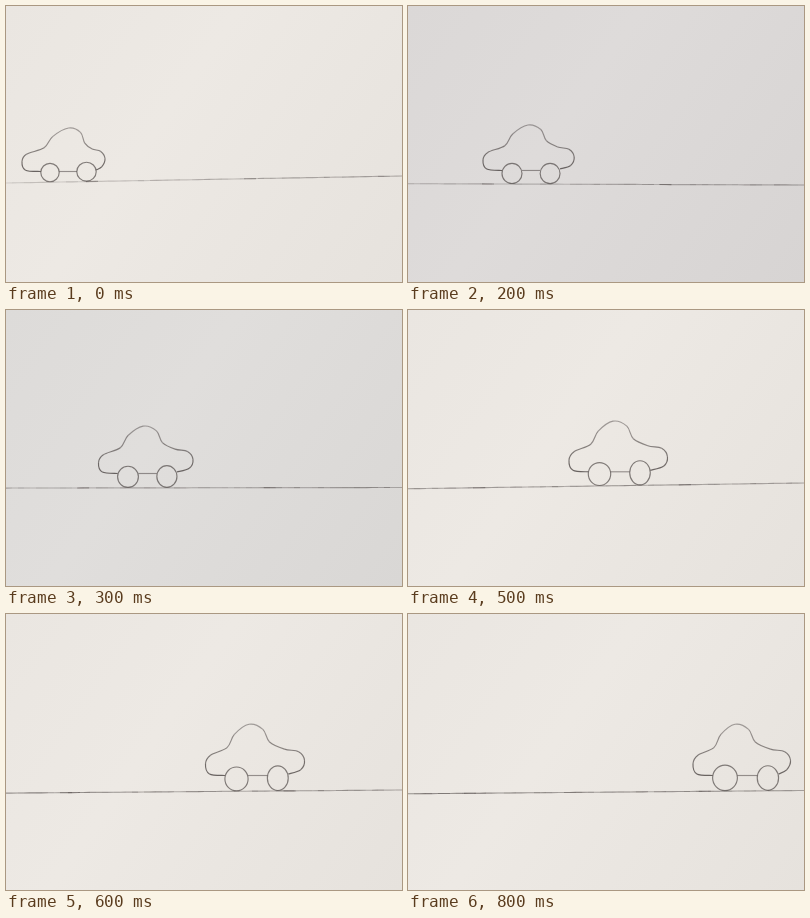
An HTML page with a canvas for the animation above (0.9 s loop, 396x276 px).

```html
<!DOCTYPE html>
<html lang="en">
<head>
<meta charset="utf-8">
<title>Pencil car</title>
<style>
html, body { margin: 0; width: 100%; height: 100%; overflow: hidden; background: #ece8e3; }
canvas { display: block; width: 100%; height: 100%; }
</style>
</head>
<body>
<canvas id="stage" width="396" height="276"></canvas>
<script>
const W = 396, H = 276, STEP = 100;
const ctx = document.getElementById('stage').getContext('2d');

// Hand-placed positions, one per drawing.
const rearWheelX = [44, 74, 104, 122, 152.5, 191.5, 230.5, 274, 317];
const groundRight = [170, 174.5, 179, 177.5, 170, 173, 176, 176, 176.5];

// Car outline in its own box, from rear underside over the roof to the front.
const outline = [[.04, .98], [0, .78], [.05, .61], [.21, .46], [.28, .2], [.42, 0],
                 [.56, .1], [.63, .35], [.79, .49], [.94, .54], [1, .71], [.96, .9]];

const mix = (a, b, t) => a + (b - a) * t;
const smooth = t => t * t * (3 - 2 * t);
const noise = seed => { const v = Math.sin(seed * 127.1) * 43758.5; return v - Math.floor(v); };

function pencil(alpha, width = 1.15) {
  ctx.strokeStyle = `rgba(62,55,54,${alpha})`;
  ctx.lineWidth = width;
  ctx.stroke();
}

function line(x1, y1, x2, y2, alpha) {
  ctx.beginPath();
  ctx.moveTo(x1, y1);
  ctx.lineTo(x2, y2);
  pencil(alpha);
}

// Smooth curve drawn span by span, so that pressure can vary along it.
function curve(points, pressure) {
  const at = i => points[Math.max(0, Math.min(points.length - 1, i))];
  for (let i = 0; i < points.length - 1; i++) {
    const [a, b, c, d] = [at(i - 1), at(i), at(i + 1), at(i + 2)];
    ctx.beginPath();
    ctx.moveTo(...b);
    ctx.bezierCurveTo(b[0] + (c[0] - a[0]) / 6, b[1] + (c[1] - a[1]) / 6,
                      c[0] - (d[0] - b[0]) / 6, c[1] - (d[1] - b[1]) / 6, ...c);
    pencil(pressure((b[1] + c[1]) / 2));
  }
}

// Warm paper that turns grey for a moment and falls off to the lower right.
function drawPaper(n) {
  const gloom = Math.exp(-((n - 2.4) ** 2));
  const shade = drop => {
    const rgb = [mix(237, 219, gloom), mix(233, 217, gloom), mix(228, 216, gloom)];
    return `rgb(${rgb.map(v => Math.round(v - drop))})`;
  };
  const paper = ctx.createLinearGradient(0, 0, W, H);
  paper.addColorStop(0, shade(3));
  paper.addColorStop(.4, shade(0));
  paper.addColorStop(1, shade(7));
  ctx.fillStyle = paper;
  ctx.fillRect(0, 0, W, H);
}

function drawGround(n, groundY) {
  const piece = 6;
  for (let x = 0; x < W; x += piece) {
    const pressure = mix(.18 + .05 * n, .42, x / W) * mix(.75, 1.25, noise(x + n));
    line(x, groundY(x), x + piece, groundY(x + piece), pressure);
  }
  for (const x of [86 - 3 * n, 244 + 6.6 * n]) {
    line(x - 6, groundY(x - 6), x + 6, groundY(x + 6), .35);
  }
}

function drawCar(n, groundY) {
  const growth = smooth(Math.min(1, n / 6));
  const lean = .15 * Math.exp(-n / 3);
  const rear = { x: rearWheelX[n], rx: 9.2 + .4 * n, ry: 9.2 + .45 * n };
  const front = { x: rear.x + 36.5 + .8 * n, rx: 9.7 + .12 * n, ry: mix(9.4, 12.3, growth) };
  const left = rear.x - 28 - .5 * n;
  const right = front.x + 18.5 + 9 * Math.sin(n / 3);
  const top = mix(122, 110.3, growth), bottom = mix(165, 161, growth);

  const body = outline.map(([u, v]) => [
    mix(left, right, u + lean * Math.sin(Math.PI * u) ** 2),
    mix(top, bottom, v)
  ]);
  const start = [rear.x - rear.rx, bottom + .5];
  const end = [front.x + front.rx, bottom - 1];
  curve([start, ...body, end], y => mix(.42, .75, (y - top) / (bottom - top)));

  for (const { x, rx, ry } of [rear, front]) {
    ctx.beginPath();
    ctx.ellipse(x, groundY(x) - ry - .5, rx, ry, 0, 0, Math.PI * 2);
    pencil(.62);
  }
  line(rear.x + rear.rx, bottom + .5, front.x - front.rx, bottom + .5, .5);
}

function draw(n) {
  const groundY = x => mix(177 + .35 * n, groundRight[n], x / W);
  drawPaper(n);
  drawGround(n, groundY);
  drawCar(n, groundY);
}

const began = performance.now();
function tick() {
  const time = Math.max(0, performance.now() - began);
  draw(Math.floor(time / STEP) % rearWheelX.length);
  requestAnimationFrame(tick);
}
tick();
</script>
</body>
</html>
```
